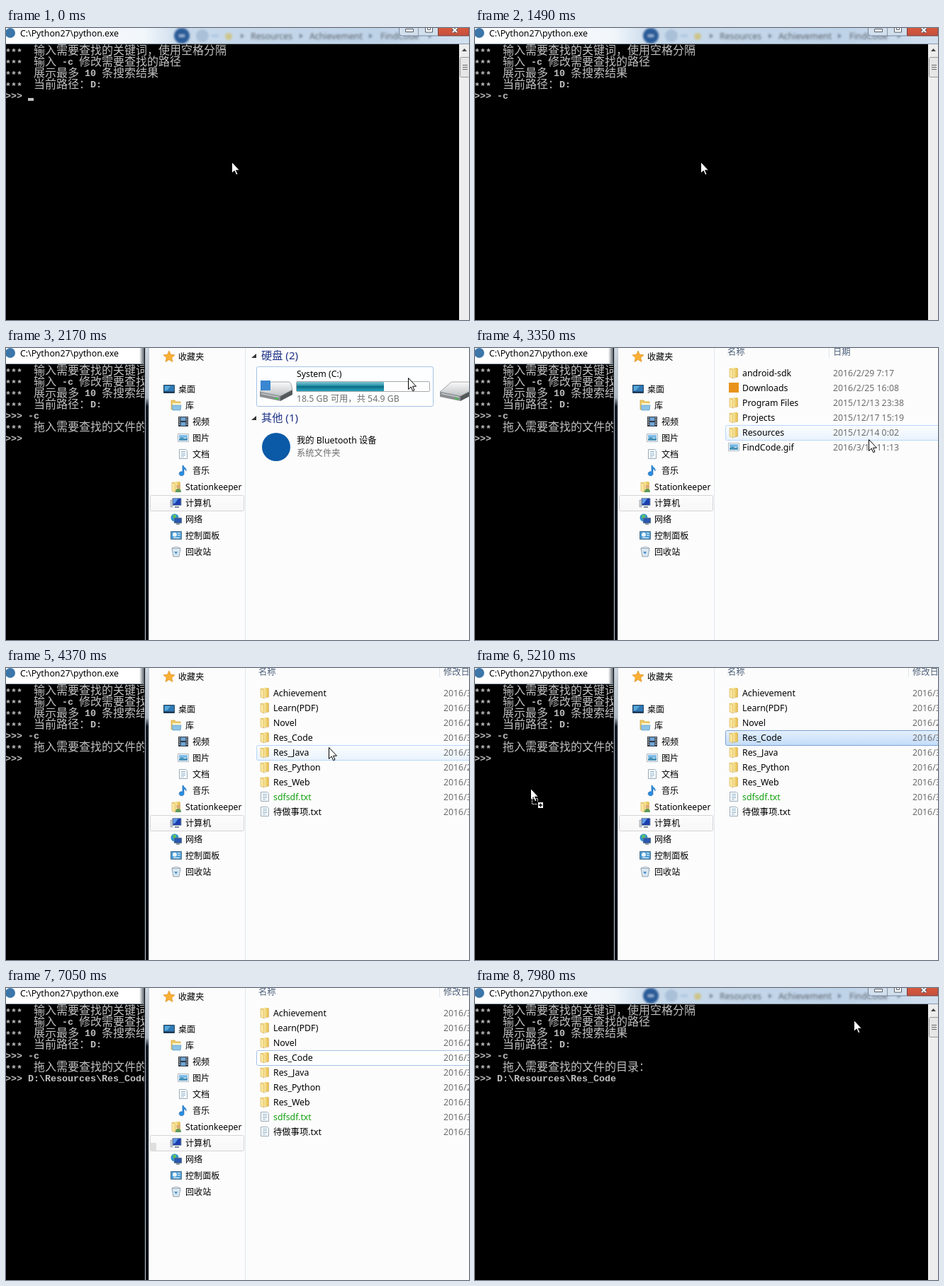
Write an HTML page that moves like this. It is 653x413 px and loops after 8 s.

```html
<!DOCTYPE html>
<html lang="zh">
<head>
<meta charset="utf-8">
<style>
html, body { margin: 0; width: 100%; height: 100%; overflow: hidden; background: #000; }
svg { display: block; }
text { font: 12.3px "Noto Sans", "Noto Sans CJK SC", sans-serif; fill: #000; }
#tree text { font-size: 12.1px; }
.con { font: bold 13.333px "Liberation Mono", monospace; fill: #c0c0c0; }
.han { font: 300 16px "Noto Sans CJK SC", "Noto Sans CJK", sans-serif; fill: #c0c0c0; }
.grp { font-size: 15.2px; fill: #1e3287; }
.dim { fill: #6d6d6d; }
.col { fill: #4c607a; }
.enc { fill: #13a010; }
.hot { fill: url(#hot); stroke: #b8d6fb; }
.sel { fill: url(#sel); stroke: #7da2ce; }
.foc { fill: #fdfeff; stroke: #a5c3e4; }
</style>
</head>
<body>
<svg id="stage" width="653" height="413" viewBox="0 0 653 413">
  <defs>
    <linearGradient id="hot" x2="0" y2="1"><stop stop-color="#fbfdff"/><stop offset="1" stop-color="#e8f2fd"/></linearGradient>
    <linearGradient id="sel" x2="0" y2="1"><stop stop-color="#e4f0fd"/><stop offset="1" stop-color="#c3dcf9"/></linearGradient>
    <linearGradient id="nav" x2="0" y2="1"><stop stop-color="#fcfcfc"/><stop offset="1" stop-color="#f7f7f7"/></linearGradient>
    <linearGradient id="bar" x2="0" y2="1"><stop stop-color="#7cc6d4"/><stop offset=".4" stop-color="#2b93a9"/><stop offset=".5" stop-color="#0b6d87"/><stop offset="1" stop-color="#2ba5bd"/></linearGradient>
    <linearGradient id="glass"><stop stop-color="#fff"/><stop offset=".3" stop-color="#f1f6fb"/><stop offset=".38" stop-color="#c9daeb"/><stop offset=".8" stop-color="#bfd3e8"/><stop offset="1" stop-color="#d3e1ef"/></linearGradient>
    <linearGradient id="edge"><stop stop-color="#fff"/><stop offset="1" stop-color="#5c636b"/></linearGradient>
    <linearGradient id="frame" x2="0" y2="1"><stop stop-color="#cfd8e0"/><stop offset=".17" stop-color="#aab5c0"/><stop offset=".2" stop-color="#141a24"/><stop offset="1" stop-color="#0a0d12"/></linearGradient>
    <linearGradient id="red" x2="0" y2="1"><stop stop-color="#d9593c"/><stop offset="1" stop-color="#c4503e"/></linearGradient>
    <linearGradient id="gold"><stop stop-color="#fbeeb0"/><stop offset="1" stop-color="#e6bd4c"/></linearGradient>
    <linearGradient id="metal" x2="0" y2="1"><stop stop-color="#fafafa"/><stop offset="1" stop-color="#bfc3c5"/></linearGradient>
    <filter id="blur" x="-20%" y="-60%" width="140%" height="220%"><feGaussianBlur stdDeviation="1.8"/></filter>
    <g id="folder">
      <path d="M2 2h5l1 12-5-1z" fill="#e3bd57"/><path d="M6 1h7v13H6z" fill="url(#gold)"/>
      <path d="M2 2l4.500 2v12L2 14z" fill="#f8e6a0" stroke="#d8ad48" stroke-width=".6"/>
      <path d="M13.500 2v12l-7 1.500" fill="none" stroke="#cfa23e" stroke-width=".7"/>
    </g>
    <g id="page">
      <path d="M2.500 1.500h9l2 2v11h-11z" fill="#f8fbfd" stroke="#9aabb8"/>
      <path d="M5 4.500h6M5 7h6M5 9.500h6M5 12h4" stroke="#8fb0c8"/>
    </g>
    <g id="pic">
      <path d="M.5 2.500h15v11H.5z" fill="#fff" stroke="#a9b6c0"/><path d="M2 4h12v4H2z" fill="#7dbbe8"/>
      <path d="M2 12V9l4-2 4 2 4-1v4z" fill="#4b94b8"/>
    </g>
    <g id="screen">
      <path d="M3 1.500h12v10H3z" fill="#1c3fae" stroke="#8492a2"/><path d="M4 2h7l-5 7H4z" fill="#5f9be8"/>
      <path d="M6 14h6" stroke="#7d8c9a" stroke-width="2"/>
    </g>
    <g id="disk">
      <path d="M1 19l29 6v7L1 26z" fill="#8b8f92"/><path d="M30 25l17-9v7L30 32z" fill="#53585b"/>
      <path d="M1 19L16 6q1-1 3-1h22q3 0 4 3l2 8-17 9z" fill="url(#metal)" stroke="#8f9497" stroke-width=".8"/>
      <path d="M3 21.500l25 5" stroke="#dfe2e3"/>
      <path d="M22 28l5 1" stroke="#45c34c" stroke-width="2"/>
    </g>
    <path id="arrow" d="M.5 .5V16.500l3.700-3.500 2.500 5.700 2.300-1-2.500-5.500h5z" fill="#fff" stroke="#000"/>
  </defs>

  <rect width="653" height="413"/>
  <g id="console"></g>

  <g id="titlebar">
    <rect width="653" height="22" fill="url(#glass)"/>
    <g filter="url(#blur)">
      <circle cx="248" cy="11" r="11" fill="#2c5c98"/><circle cx="277" cy="11" r="9" fill="#a9c0d8"/>
      <path d="M244 11h8M290 11h10" stroke="#a8c4e0" stroke-width="3"/>
      <circle cx="314" cy="12" r="5" fill="#cdc58c"/>
      <g opacity=".55"><text x="345" y="16">Resources</text><text x="428" y="16">Achievement</text><text x="528" y="16">FindCode</text>
      <path d="M331 8l5 3-5 4zM414 8l5 3-5 4zM512 8l5 3-5 4zM596 8l5 3-5 4z" fill="#345"/></g>
    </g>
    <path d="M554.500-1v8q0 4 4 4h51V-1z" fill="#d2dfec" stroke="#7488a0"/>
    <path d="M609.500-1v12H653V-1z" fill="url(#red)" stroke="#70423f" data-t="0 2040 7980 8000"/>
    <g data-t="2040 2170">
      <rect width="653" height="22" fill="#fff" opacity=".52"/>
      <path d="M609.500-1v12H653V-1z" fill="#e4ebf2" stroke="#8b98a8"/>
    </g>
    <path d="M581.500 0v11" stroke="#8596aa"/>
    <path d="M563.500 1.500h11v4h-11zM591.500-1v7h10v-7M594.500 0v2.500h4V0" fill="#fff" stroke="#525b68"/>
    <path d="M630 6l6-6M636 6l-6-6" stroke="#525b68" stroke-width="4"/><path d="M630 6l6-6M636 6l-6-6" stroke="#fff" stroke-width="2"/>
    <path d="M0 22.500h653" stroke="#8898a8"/>
    <rect x="639" y="23" width="14" height="390" fill="#ededed"/>
    <path d="M643 33l3.500-4 3.500 4z" fill="#444"/>
    <rect x="640.500" y="41.500" width="14" height="28" rx="2" fill="#e6e6e6" stroke="#979797"/>
    <path d="M644 52.500h7M644 55.500h7M644 58.500h7" stroke="#666"/>
  </g>
  <g data-t="2170 7980"><rect width="196" height="22" fill="#fff"/><rect x="188" width="7" height="22" fill="url(#edge)"/></g>
  <circle cx="6" cy="7" r="7" fill="#3c76a8"/>
  <text x="20" y="11.500">C:\Python27\python.exe</text>

  <g data-t="2170 7980">
    <rect x="195" width="458" height="413" fill="#0a0d12"/>
    <rect x="197" width="4" height="413" fill="url(#frame)"/>
    <path d="M196.500 0v413" stroke="#b9c3cc"/>
    <rect x="202" width="451" height="413" fill="#fcfcfc"/>
    <path d="M201.500 0v413" stroke="#c3ccd4"/><path d="M337.500 0v413" stroke="#e1e7ee"/>
    <rect x="203.500" y="208.500" width="132" height="22" rx="2" fill="url(#nav)" stroke="#d5d5d5"/>
    <rect x="204" y="219" width="8" height="11" fill="#dedede" data-t="6400 7980"/>
    <g id="tree"></g>

    <g data-t="2170 2960">
      <rect class="foc" x="353.500" y="26.500" width="249" height="56" rx="2" data-t="2170 2440"/>
      <rect class="foc" x="607.500" y="26.500" width="249" height="56" rx="2" data-t="2560 2810"/>
      <rect class="sel" x="607.500" y="26.500" width="249" height="56" rx="2" data-t="2810 2960"/>
      <path d="M353 8v6h-7zM353 96v6h-7z" fill="#333"/>
      <text class="grp" x="360" y="16">硬盘 (2)</text><text class="grp" x="360" y="104">其他 (1)</text>
      <use href="#disk" x="357" y="43"/><use href="#disk" x="611" y="43"/>
      <rect x="359" y="46" width="14" height="14" fill="#3a86d0"/>
      <text x="410" y="41">System (C:)</text>
      <rect x="409.500" y="47.500" width="188" height="14" rx="1" fill="#fdfdfd" stroke="#a8a8a8"/>
      <rect x="410" y="48" width="123" height="13" fill="url(#bar)"/>
      <text class="dim" x="410" y="76">18.5 GB 可用，共 54.9 GB</text>
      <circle cx="381" cy="140" r="20" fill="#0a5aa8"/>
      <text x="410" y="135">我的 Bluetooth 设备</text><text class="dim" x="410" y="153">系统文件夹</text>
    </g>
    <g id="drive" data-t="2960 3860"></g>
    <g id="res" data-t="3860 7980"></g>
    <g data-t="4790 4940" opacity=".55"><use href="#folder" transform="translate(340 8) scale(6.300)"/></g>
  </g>

  <g id="mouse">
    <use href="#arrow"/>
    <g data-t="4790 5610">
      <path d="M2.500 14.500h8v8h-8z" fill="none" stroke="#fff" stroke-dasharray="2 1"/>
      <path d="M10.500 19.500h8v9h-8z" fill="#fff" stroke="#000"/><path d="M12 24h5M14.500 21.500v5" stroke="#000" stroke-width="1.500"/>
    </g>
  </g>
</svg>
<script>
const LOOP = 8000, END = 7980;
const $ = id => document.getElementById(id);
const span = (a, b) => `data-t="${a} ${b}"`;
const use = (id, x, y) => `<use href="#${id}" x="${x}" y="${y}"/>`;
const label = (s, x, y, cls = '') => `<text class="${cls}" x="${x}" y="${y}">${s}</text>`;

// Console cells are 8 px wide, Chinese characters take two.
function line(row, str, from = 0, col = 0) {
  let out = '';
  for (const [run] of str.matchAll(/[!-~]+| +|[^ -~]+/g)) {
    const han = run.charCodeAt(0) > 127;
    const y = 23 + row * 16 + (han ? 14 : run[0] === '*' ? 15 : 13);
    if (run[0] !== ' ') out += label(run.replace(/>/g, '&gt;'), col * 8 - 1, y, han ? 'han' : 'con');
    col += run.length * (han ? 2 : 1);
  }
  return `<g ${span(from, LOOP)}>${out}</g>`;
}
const caret = (x, a, b) => `<rect x="${x}" y="99" width="8" height="4" fill="#c0c0c0" ${span(a, b)}/>`;

$('console').innerHTML =
  ['输入需要查找的关键词，使用空格分隔', '输入 -c 修改需要查找的路径', '展示最多 10 条搜索结果', '当前路径：D:']
    .map((s, i) => line(i, '***  ' + s)).join('') +
  line(4, '>>>') + line(4, '-', 650, 4) + line(4, 'c', 800, 5) +
  line(5, '***  拖入需要查找的文件的目录：', 1610) + line(6, '>>>', 1610) +
  line(6, 'D:\\Resources\\Res_Code', 5610, 4) +
  caret(31, 0, 530) + caret(47, 960, 1490);

const art = {
  star: '<path d="M8 0l2.300 5.300 5.700.6-4.300 3.800 1.300 5.800L8 12.500l-5 3 1.300-5.800L0 5.900l5.700-.6z" fill="#fbb034" stroke="#d98a1c" stroke-width=".7"/>',
  desk: '<path d="M.5 2.500h15v11H.5z" fill="#2f78b4" stroke="#29455e"/><path d="M1 11.500h14v2H1z" fill="#1c3550"/><path d="M2 4l8 0-5 6H2z" fill="#58a9d8"/>',
  lib: '<path d="M1 1h5l1 2h7v11H1z" fill="#efcb63" stroke="#cfa23e" stroke-width=".7"/><path d="M3 5h12v6H3z" fill="#fdf6d8"/><path d="M2 8h13l-1 7H3z" fill="#8cc3e6" stroke="#5d9cc8" stroke-width=".7"/>',
  film: '<path d="M1 1h14v14H1z" fill="#333c48"/><path d="M4.500 2h7v5h-7zM4.500 9h7v5h-7z" fill="#6fa3d4"/><path d="M2.700 2v12M13.300 2v12" stroke="#eee" stroke-width="1.300" stroke-dasharray="1.500 1.500"/>',
  pic: use('pic', 0, 0), page: use('page', 0, 0),
  note: '<path d="M8 1c0 3 5 3 4 8-1-3-2.500-3-3-3v6a3.500 3 0 1 1-2-2V1z" fill="#2b8de0" stroke="#1a62ac" stroke-width=".6"/>',
  user: use('folder', 0, 0) + '<circle cx="11" cy="8" r="2.500" fill="#d9a878"/><path d="M7 16q0-5 4-5t4 5z" fill="#5f9a58"/>',
  pc: use('screen', 0, 0) + '<path d="M0 4h3v10H0z" fill="#c3cbd3" stroke="#7c8894" stroke-width=".5"/>',
  net: '<circle cx="6" cy="6" r="5.500" fill="#2f93d0"/><path d="M3 3q4-3 5 0t-4 4zM7 8l3-1-1 3z" fill="#63c05c"/><path d="M5.500 6.500h10v7h-10z" fill="#2858b0" stroke="#5d7084"/><path d="M8 15h5" stroke="#6c7b88" stroke-width="1.500"/>',
  panel: '<path d="M.5 2.500h15v11H.5z" fill="#4a9bd4" stroke="#55748c"/><circle cx="6" cy="7" r="3" fill="#e8f4fc"/><path d="M10 5h4M10 8h4M4 11.500h9" stroke="#fff"/>',
  bin: '<path d="M2 3h12l-2 12H4z" fill="#dce8f0" stroke="#8ba0b0"/><path d="M3 3q5-4 10 0z" fill="#f4f8fb" stroke="#8ba0b0" stroke-width=".7"/><path d="M5 8h5l-2 4z" fill="#4f94cc"/>',
  app: '<rect x="1" y="1" width="14" height="14" fill="#e8941c"/>'
};
const icon = (name, x, y) => art[name] ? `<g transform="translate(${x} ${y})">${art[name]}</g>` : use(name, x, y);

// depth, icon, name
const item = ([depth, name, text], i) => {
  const y = i ? 35 + 23 * i : 12, x = 222 + depth * 10;
  return icon(name, x, y - 8) + label(text, x + 21, y + 5);
};
$('tree').innerHTML = [
  [0, 'star', '收藏夹'], [0, 'desk', '桌面'], [1, 'lib', '库'], [2, 'film', '视频'], [2, 'pic', '图片'],
  [2, 'page', '文档'], [2, 'note', '音乐'], [1, 'user', 'Stationkeeper'], [1, 'pc', '计算机'],
  [1, 'net', '网络'], [1, 'panel', '控制面板'], [1, 'bin', '回收站']
].map(item).join('');

const mark = (row, cls, a, b) =>
  `<rect class="${cls}" x="353.500" y="${25.5 + 21 * row}" width="310" height="21" rx="2" ${span(a, b)}/>`;
const files = (rows, x) => rows.map(([name, date, kind = 'folder', cls = ''], i) => {
  const y = 35 + 21 * i;
  return icon(kind, 357, y - 8) + label(name, 377, y + 5, cls) + label(date, x, y + 5, 'dim');
}).join('');
const head = (text, x) => label('名称', 356, 10, 'col') + label(text, x, 10, 'col') +
  `<path d="M${x - 5.5} 0v13" stroke="#dde7f1"/>`;

$('drive').innerHTML = head('日期', 505) +
  mark(1, 'hot', 2960, 3080) + mark(2, 'hot', 3080, 3200) + mark(4, 'hot', 3200, 3710) + mark(4, 'sel', 3710, 3860) +
  files([
    ['android-sdk', '2016/2/29 7:17'], ['Downloads', '2016/2/25 16:08', 'app'], ['Program Files', '2015/12/13 23:38'],
    ['Projects', '2015/12/17 15:19'], ['Resources', '2015/12/14 0:02'], ['FindCode.gif', '2016/3/11 11:13', 'pic']
  ], 505);

$('res').innerHTML = head('修改日期', 617) +
  mark(4, 'hot', 3980, 4130) + mark(5, 'hot', 4130, 4250) + mark(4, 'hot', 4250, 4520) +
  mark(3, 'hot', 4520, 4670) + mark(3, 'sel', 4670, 6930) + mark(3, 'foc', 6930, END) +
  files([
    ['Achievement', '2016/3'], ['Learn(PDF)', '2016/3'], ['Novel', '2016/2'], ['Res_Code', '2016/3'],
    ['Res_Java', '2016/3'], ['Res_Python', '2016/2'], ['Res_Web', '2016/3'],
    ['sdfsdf.txt', '2016/3', 'page', 'enc'], ['待做事项.txt', '2016/3', 'page']
  ], 617);

// time, x, y of the pointer tip; it jumps from place to place
const path = [
  [0, 318, 189], [2170, 567, 42], [2320, 590, 46], [2440, 618, 50], [2560, 630, 52],
  [3080, 600, 75], [3200, 565, 118], [3350, 555, 129], [3470, 550, 127], [3590, 546, 124],
  [4130, 520, 133], [4250, 485, 120], [4370, 455, 112], [4520, 430, 102], [4790, 388, 92],
  [4940, 162, 158], [5090, 110, 166], [5210, 78, 170], [6010, 92, 171], [6130, 108, 172],
  [6280, 260, 205], [6400, 630, 195], [7050, -50, -50], [END, 534, 45]
];
const timed = [...document.querySelectorAll('[data-t]')].map(el => [el, el.dataset.t.split(' ').map(Number)]);

function draw() {
  const t = performance.now() % LOOP;
  for (const [el, at] of timed) {
    const on = at.some((a, i) => i % 2 === 0 && t >= a && t < at[i + 1]);
    el.style.display = on ? '' : 'none';
  }
  const [, x, y] = path.findLast(p => p[0] <= t);
  $('mouse').setAttribute('transform', `translate(${x} ${y})`);
  requestAnimationFrame(draw);
}
draw();
</script>
</body>
</html>
```
